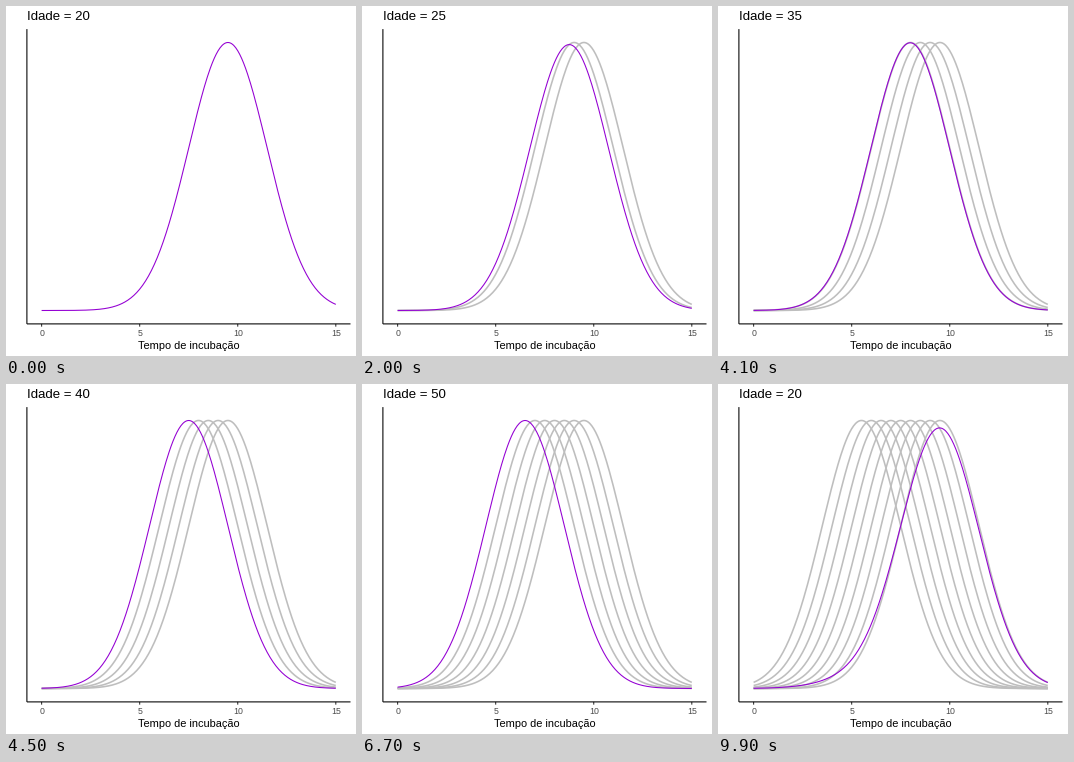
Animation, 350 px wide and 350 px high, one loop 10 s. Source, as a matplotlib script:

```python
import numpy as np
import matplotlib.pyplot as plt
from matplotlib.animation import FuncAnimation

SIZE, DPI = 350, 100
PX = 72 / DPI  # points per pixel
LEFT, RIGHT, TOP, BOTTOM = 20.9, 344.5, 23.1, 317.9

AGES = range(20, 61, 5)
HOLD = 6
STEPS = [6, 6] + [5] * 7  # transition frames after each state
FRAMES = 100

plt.rcParams["font.family"] = "Liberation Sans"

t = np.linspace(0, 15, 301)
curves = [np.exp(-(t - (11.5 - age / 10)) ** 2 / 8) for age in AGES]


def ease(p):
    return 4 * p**3 if p < 0.5 else 1 - 4 * (1 - p) ** 3


def px_x(v):
    return LEFT + (RIGHT - LEFT) * (v / 15 + 0.05) / 1.1


def px_y(v):
    return BOTTOM - (BOTTOM - TOP) * (v + 0.05) / 1.1


fig = plt.figure(figsize=(SIZE / DPI, SIZE / DPI), dpi=DPI, facecolor="white")
ax = fig.add_axes([0, 0, 1, 1])
ax.set_xlim(0, SIZE)
ax.set_ylim(SIZE, 0)
ax.axis("off")


def line(x, y, color, width, z=2):
    return ax.plot(x, y, color=color, lw=width * PX, zorder=z, snap=False,
                   solid_capstyle="butt", solid_joinstyle="round")[0]


def label(x, y, text, size, color="black", ha="center"):
    return ax.text(x, y, text, fontsize=size * PX, color=color, ha=ha,
                   va="baseline")


line([LEFT, LEFT], [TOP, BOTTOM], "black", 1.07)
line([LEFT, RIGHT], [BOTTOM, BOTTOM], "black", 1.07)
for v in (0, 5, 10, 15):
    line([px_x(v)] * 2, [BOTTOM, BOTTOM + 2.75], "#333333", 1.07, 1)
    label(px_x(v), 330, str(v), 8.8, "#4D4D4D")
label((LEFT + RIGHT) / 2, 343, "Tempo de incubação", 11)
title = label(LEFT, 14, "", 13.2, ha="left")

trail = [line(px_x(t), px_y(c), "#BEBEBE", 1.6, 3) for c in curves]
current = line(px_x(t), px_y(curves[0]), "#9400D3", 1.07, 4)


def locate(frame):
    """Return the state index and the progress towards the next one."""
    start = HOLD - 1
    for i, n in enumerate(STEPS):
        if frame <= start + n:
            return i, max(0, frame - start) / n
        start += n + HOLD


def update(frame):
    i, p = locate(frame)
    if p == 1:
        i, p = i + 1, 0
    nxt = (i + 1) % len(curves)
    k = ease(p)
    current.set_ydata(px_y((1 - k) * curves[i] + k * curves[nxt]))
    for j, past in enumerate(trail):
        past.set_visible(j < i or (j == i and p > 0))
    title.set_text(f"Idade = {AGES[nxt if p > 0.5 else i]}")
    return [current, title, *trail]


anim = FuncAnimation(fig, update, frames=FRAMES, interval=100, repeat=True,
                     repeat_delay=0, blit=False)
plt.show()
```
